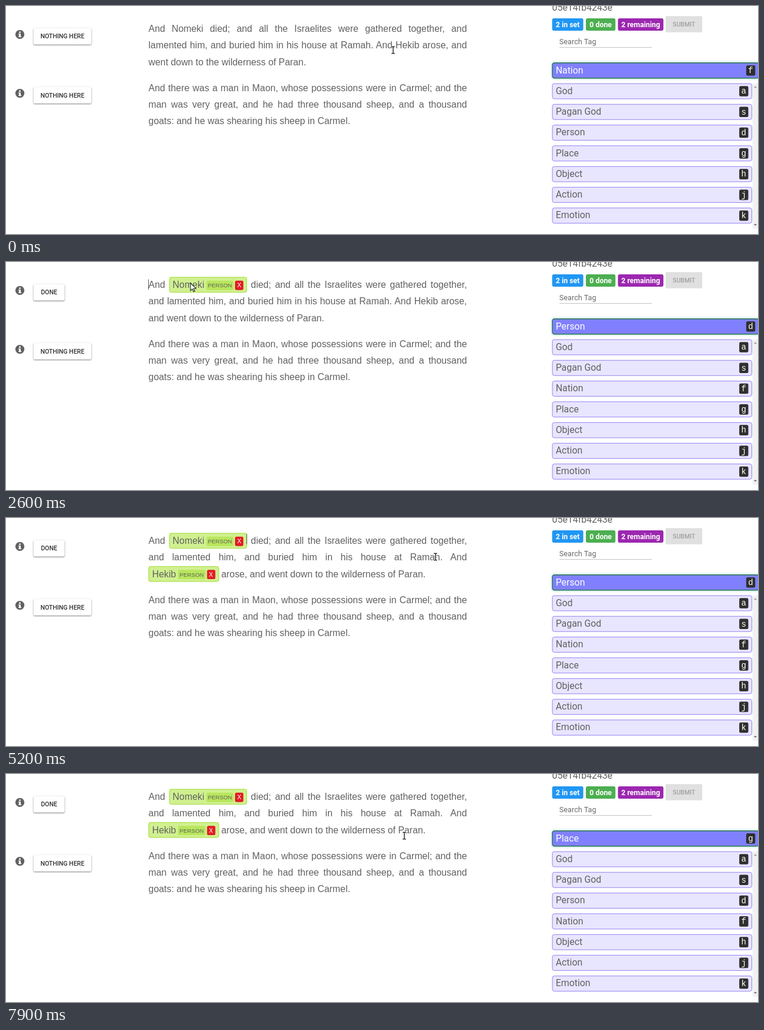
Write an HTML page that moves like this. It is 1280 by 388 pixels and loops after 8 s.

```html
<!DOCTYPE html>
<html lang="en">
<head>
<meta charset="utf-8">
<title>Text tagging</title>
<style>
  html, body { margin: 0; width: 100%; height: 100%; overflow: hidden; background: #fff; }
  #text {
    position: absolute; left: 275px; top: 28px; width: 614.5px;
    transform: scale(.882); transform-origin: -275px -28px;
    font: 18px/32px "Liberation Sans", Arial, sans-serif;
    color: #616161; text-align: justify;
  }
  p { margin: 0 0 18px; }
  .tag { padding: 4px 6px; border: 1px solid #a2dc35; border-radius: 4px; background: #d0f090; white-space: nowrap; }
  .tag small, .tag b { line-height: 0; vertical-align: 1px; border-radius: 3px; }
  .tag small { margin-left: 4px; padding: 3px; font-size: 11px; background: #b8e65c; }
  .tag b { margin-left: 3px; padding: 2px 4px; font-size: 12px; font-weight: 400; color: #fff; background: #e31b23; }
  svg { position: absolute; left: 0; top: 0; width: 1280px; height: 388px; overflow: hidden; }
  svg text { font-family: Roboto, sans-serif; }
  svg .key { font-family: "Liberation Mono", monospace; }
  .raised { filter: drop-shadow(.4px 1px 1.1px rgba(0, 0, 0, .5)); }
  .glow { filter: drop-shadow(0 0 2px rgba(90, 190, 200, .6)); }
</style>
</head>
<body>
<div id="text">
  <p id="verse"></p>
  <p>And there was a man in Maon, whose possessions were in Carmel; and the man was very great, and he had three thousand sheep, and a thousand goats: and he was shearing his sheep in Carmel.</p>
</div>
<svg><g id="panel"></g><g id="live"></g></svg>
<script>
const LOOP = 8000, STEP = 100, BLINK = 600;
const FIRST_TAG = 2600, SECOND_TAG = 5200;
const TAGS = [['God', 'a'], ['Pagan God', 's'], ['Person', 'd'], ['Nation', 'f'],
  ['Place', 'g'], ['Object', 'h'], ['Action', 'j'], ['Emotion', 'k']];

// Pointer waypoints: time, x, y
const PATH = [
  [0, 659, 75], [100, 659, 75], [350, 830, 150], [600, 978, 215],
  [1300, 978, 215], [1500, 640, 130], [1700, 391, 79], [2000, 325, 48], [2200, 314, 38], [2400, 314, 36],
  [2700, 314, 36], [3000, 360, 27], [3300, 470, 52], [3600, 590, 78],
  [3900, 635, 83], [4300, 685, 70], [4500, 709, 68], [4900, 731, 66],
  [5400, 731, 66], [5800, 728, 90], [5900, 728, 90], [6400, 866, 212], [6800, 948, 257],
  [7200, 948, 257], [7500, 790, 145], [7700, 663, 70], [7900, 678, 105], [LOOP, 678, 105]
];

// Text carets: start, end, x, top
const CARETS = [[1200, 2400, 936, 206], [FIRST_TAG, SECOND_TAG, 242.5, 29.5],
  [SECOND_TAG, 7100, 409.7, 27], [7200, LOOP, 936, 242]];

const $ = id => document.getElementById(id);
const rect = (x, y, w, h, fill, extra = '') =>
  `<rect x="${x}" y="${y}" width="${w}" height="${h}" fill="${fill}" ${extra}/>`;
const label = (x, y, size, fill, text, extra = '') =>
  `<text x="${x}" y="${y}" font-size="${size}" fill="${fill}" ${extra}>${text}</text>`;
const MIDDLE = 'text-anchor="middle"';

function badge(x, w, fill, text) {
  return rect(x, 21, w, 21, fill, 'rx="3"') +
    label(x + w / 2, 35.5, 12.35, '#fff', text, MIDDLE + ' font-weight="700"');
}

function info(y) {
  return `<circle cx="23.6" cy="${y}" r="7.7" fill="#616161"/>` +
    `<path d="M22.2 ${y - 5}h2.8v2.4h-2.8zM21.2 ${y - 1.4}h3.8v4.4h1.2v1.7h-5v-1.7h1.1v-2.7h-1.1z" fill="#fff"/>`;
}

function button(y, w, text) {
  return rect(46.9, y, w, 28, '#fff', 'rx="2" class="raised"') +
    label(46.9 + w / 2, y + 17.9, 10.58, '#333', text, MIDDLE + ' font-weight="500"');
}

function tagRow(center, [name, key], selected) {
  const style = selected
    ? rect(930, center - 12.8, 351, 26, '#8080ff', 'rx="3.5" stroke="#2b7a4b" stroke-width="1.5" class="glow"')
    : rect(930, center - 12.8, 339.5, 26, '#e8e5ff', 'rx="3.5" stroke="#8b78f0" stroke-width=".9"');
  const keyX = selected ? 1267.6 : 1255.8;
  return style + label(935.7, center + 4.9, 15.88, selected ? '#fff' : '#616161', name) +
    rect(keyX - 7.7, center - 8.6, 15.4, 17.6, '#2f2f2f', 'rx="2.5"') +
    label(keyX, center + 4.5, 14.1, '#fff', key, MIDDLE + ' class="key"');
}

function panel(selected, tagged) {
  const rows = TAGS.filter(tag => tag[0] !== selected);
  return info(48.4) + info(148.6) +
    (tagged ? button(37.4, 52.8, 'DONE') : button(37.4, 98.4, 'NOTHING HERE')) +
    button(137.8, 98.4, 'NOTHING HERE') +
    label(929.6, 7.6, 15.88, '#616161', '05e14fb4243e') +
    badge(929.6, 53, '#2196f3', '2 in set') +
    badge(987, 50.3, '#4caf50', '0 done') +
    badge(1041.6, 77.4, '#9c27b0', '2 remaining') +
    rect(1123, 17.2, 62, 27.6, '#e0e0e0') +
    label(1154, 34.9, 10.58, '#a0a0a0', 'SUBMIT', MIDDLE + ' font-weight="500"') +
    label(941.8, 64.6, 12.7, '#6b6b6b', 'Search Tag') +
    rect(942, 70, 157.5, .9, '#bdbdbd') +
    rect(1270.6, 131.5, 9.4, 247, '#f1f1f1') +
    '<path d="M1272.8 139.3h5.4l-2.7-3.2z" fill="#a3a3a3"/><path d="M1272.8 371h5.4l-2.7 3.2z" fill="#7a7a7a"/>' +
    tagRow(109.6, TAGS.find(tag => tag[0] === selected), true) +
    rows.map((tag, i) => tagRow(144.8 + 35.28 * i, tag, false)).join('');
}

function verse(tagCount) {
  const [first, second] = ['Nomeki', 'Hekib'].map((name, i) =>
    i < tagCount ? `<span class="tag">${name}<small>PERSON</small><b>X</b></span>` : name);
  return `And ${first} died; and all the Israelites were gathered together, and lamented him, and buried him ` +
    `in his house at Ramah. And ${second} arose, and went down to the wilderness of Paran.`;
}

function pointer(t) {
  const i = PATH.findIndex(point => point[0] > t);
  const [t0, x0, y0] = PATH[i - 1], [t1, x1, y1] = PATH[i];
  const k = (t - t0) / (t1 - t0);
  const x = x0 + (x1 - x0) * k, y = y0 + (y1 - y0) * k;
  const overTag = t >= FIRST_TAG && x > 277 && x < 409 && y > 26 && y < 52;
  const place = `transform="translate(${x} ${y})"`;
  if (overTag || x > 929) {
    return `<path ${place} d="M0 0V12.8L3 10 5.4 14.6 7.4 13.6 5.2 9.2H9.4Z" fill="#fff" stroke="#222" stroke-width="1.1"/>`;
  }
  const beam = 'M-2.7 -5.8H-1L0 -5 1 -5.8H2.7M0 -5V5M-2.7 5.8H-1L0 5 1 5.8H2.7';
  return `<g ${place} fill="none"><path d="${beam}" stroke="#fff" stroke-width="3"/>` +
    `<path d="${beam}" stroke="#222" stroke-width="1.4"/></g>`;
}

function caret(t) {
  const active = CARETS.find(([start, end]) => t >= start && t < end);
  if (!active || Math.floor((t - active[0]) / BLINK) % 2) return '';
  return rect(active[2] - .4, active[3], .9, 17.6, '#444');
}

let shownState, shownTime;
function draw(now) {
  const t = Math.floor(now % LOOP / STEP) * STEP;
  if (t !== shownTime) {
    const selected = t < 1100 ? 'Nation' : t < 7100 ? 'Person' : 'Place';
    const tagCount = (t >= FIRST_TAG) + (t >= SECOND_TAG);
    const state = selected + tagCount;
    if (state !== shownState) {
      $('panel').innerHTML = panel(selected, tagCount > 0);
      $('verse').innerHTML = verse(tagCount);
      shownState = state;
    }
    $('live').innerHTML = caret(t) + pointer(t);
    shownTime = t;
  }
}

const start = performance.now();
function tick() {
  draw(performance.now() - start);
  requestAnimationFrame(tick);
}
tick();
</script>
</body>
</html>
```
